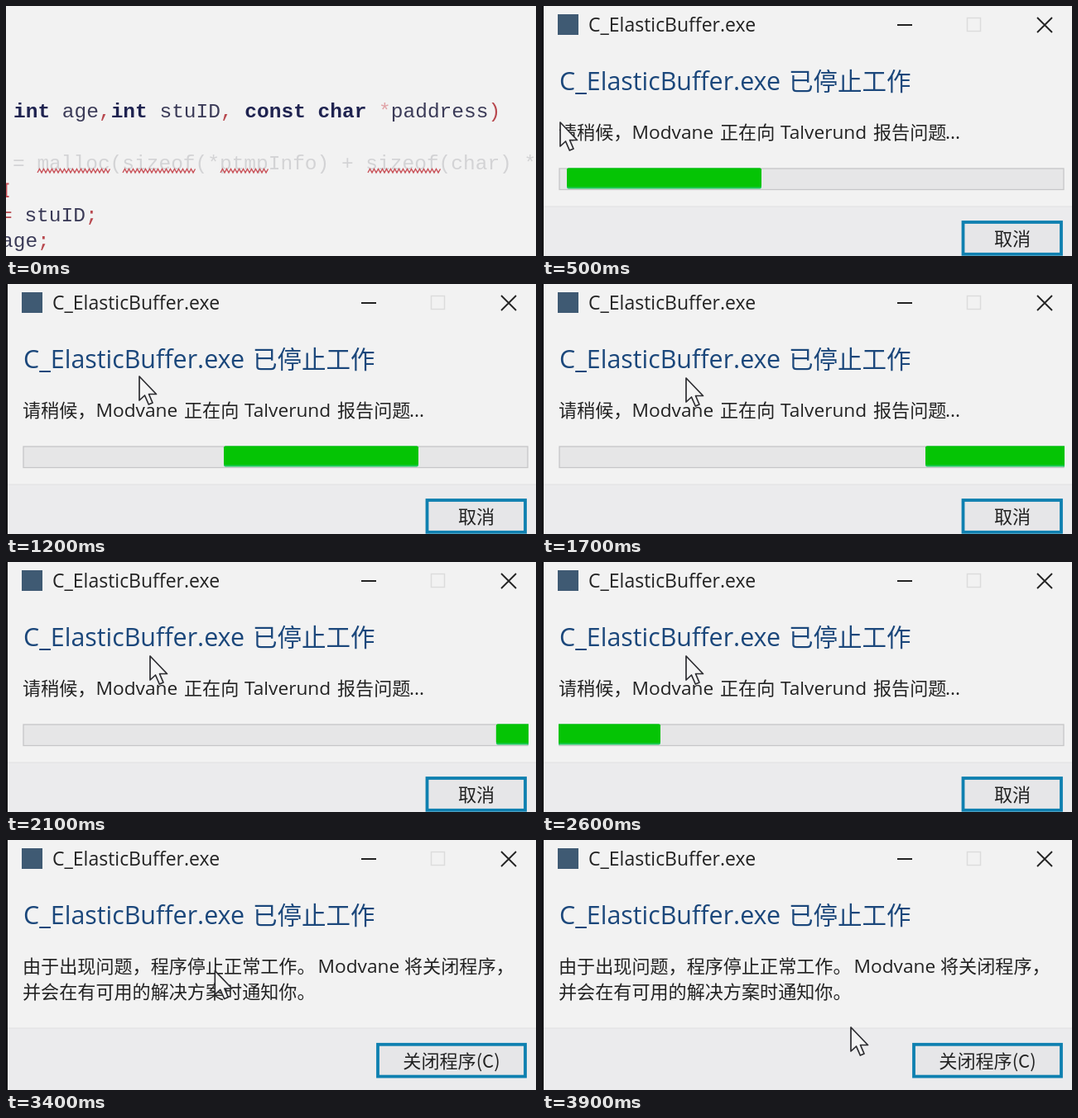
These frames come from a looping animation (640 px wide and 303 px high, 4 s). An HTML page:

```html
<!DOCTYPE html>
<html lang="zh-CN">
<head>
<meta charset="utf-8">
<style>
  html, body { margin: 0; width: 100%; height: 100%; overflow: hidden; background: #f2f2f2; }
  svg { display: block; width: 100vw; height: 100vh; }
  text { white-space: pre; }
  .code { font: 24.5px "Liberation Mono", monospace; fill: #3b3b58; }
  .key { font-weight: bold; fill: #1f2350; }
  .red { fill: #b8484e; }
  .pale { fill: #e0a2a6; }
  .faint { fill: #d3d3d5; }
  .ui { font: 22.7px "Open Sans", "Noto Sans CJK SC", "Noto Sans CJK", sans-serif; fill: #222; }
  .cjk { font-family: "Noto Sans CJK SC", "Noto Sans CJK", sans-serif; font-size: 22.1px; }
  .title { font-size: 23px; }
  .head { font-size: 30.4px; fill: #1b477b; }
  .head.cjk { font-size: 29.5px; }
</style>
</head>
<body>
<svg viewBox="0 0 640 303" preserveAspectRatio="none">
  <defs>
    <clipPath id="track"><rect x="20" y="196" width="611" height="27"/></clipPath>
  </defs>
  <rect width="640" height="303" fill="#f2f2f2"/>

  <g id="editor" class="code">
    <text x="9" y="135"><tspan class="key">int</tspan> age<tspan class="red">,</tspan><tspan class="key">int</tspan> stuID<tspan class="red">,</tspan> <tspan class="key">const</tspan> <tspan class="key">char</tspan> <tspan class="pale">*</tspan>paddress<tspan class="red">)</tspan></text>
    <text x="8" y="198" class="faint">= malloc(sizeof(*ptmpInfo) + sizeof(char) *</text>
    <path id="waves" fill="none" stroke="#c9535a" stroke-width="1.4"/>
    <path d="M-2 215.5H3.5M-2 231H3.5M0.5 215V231" fill="none" stroke="#c8525a" stroke-width="1.8"/>
    <text x="-7" y="261"><tspan class="red">=</tspan> stuID<tspan class="red">;</tspan></text>
    <text x="-6" y="292">age<tspan class="red">;</tspan></text>
  </g>

  <g id="dialog" class="ui">
    <rect id="footer" width="640" height="80" fill="#ebebed"/>
    <path id="rule" d="M0 0H640" stroke="#dfdfe1"/>
    <rect width="2" height="303" fill="#151518"/>
    <rect x="19" y="10" width="25" height="25" fill="#3f5a73"/>
    <text x="56" y="31" class="title">C_ElasticBuffer.exe</text>
    <path d="M429 23H447" stroke="#222" stroke-width="2"/>
    <rect x="513.5" y="14.5" width="16" height="16" fill="none" stroke="#dcdcdc" stroke-width="1.5"/>
    <path d="M598 14L616 32M616 14L598 32" stroke="#222" stroke-width="1.8"/>
    <text x="21" y="102" class="head">C_ElasticBuffer.exe</text>
    <text x="298" y="102" class="head cjk">已停止工作</text>

    <g id="reporting">
      <text x="20" y="161" class="cjk">请稍候，</text>
      <text x="108.5" y="161">Modvane</text>
      <text x="215" y="161" class="cjk">正在向</text>
      <text x="288" y="161">Talverund</text>
      <text x="400" y="161" class="cjk">报告问题</text>
      <text x="487" y="161">...</text>
      <rect x="21" y="197" width="609" height="25.5" fill="#e6e6e7" stroke="#c6c6c8" stroke-width="1.3"/>
      <g id="bar" clip-path="url(#track)">
        <g id="fill">
          <rect y="196.5" width="235" height="25" rx="2" fill="#1fc95a"/>
          <rect y="196.5" width="235" height="23" rx="2" fill="#05c405"/>
        </g>
      </g>
    </g>

    <g id="stopped">
      <text x="20" y="161" class="cjk">由于出现问题，程序停止正常工作。</text>
      <text x="376.5" y="161">Modvane</text>
      <text x="481" y="161" class="cjk">将关闭程序，</text>
      <text x="20" y="192" class="cjk">并会在有可用的解决方案时通知你。</text>
    </g>

    <rect id="button" fill="#e6e6e8" stroke="#0f80b0" stroke-width="3.8"/>
    <text id="label" text-anchor="middle" class="cjk"></text>
    <path id="pointer" d="M0 0V29L6.5 23L11.3 34L16 32L11.5 21.5H20.5Z" fill="#f4f4f4" stroke="#2c2c30" stroke-width="1.7" stroke-linejoin="round"/>
  </g>
</svg>
<script>
const LOOP = 4000, STEP = 100, OPEN = 200, STOP = 2900;
const $ = id => document.getElementById(id);
const show = (id, on) => $(id).setAttribute('display', on ? 'inline' : 'none');
const set = (id, attrs) => {
  for (const k in attrs) $(id).setAttribute(k, attrs[k]);
};
const smooth = u => u * u * (3 - 2 * u);
const linear = u => u;

// Each key is [time, ...values]; values hold beyond the ends.
function sample(keys, t, ease) {
  if (t <= keys[0][0]) return keys[0].slice(1);
  for (let i = 1; i < keys.length; i++) {
    const a = keys[i - 1], b = keys[i];
    if (t <= b[0]) {
      const u = ease((t - a[0]) / (b[0] - a[0]));
      return a.slice(1).map((v, j) => v + (b[j + 1] - v) * u);
    }
  }
  return keys[keys.length - 1].slice(1);
}

const barKeys = [[200, -37], [300, -3], [500, 30], [1200, 263], [1700, 463], [2600, 753], [2900, 853]];
const pointerKeys = [[500, 22, 141], [1200, 161, 112], [1700, 174, 114], [3100, 174, 114], [3800, 373, 227]];
const TRAVEL = 845;

function wave(from, to) {
  let d = `M${from} 202`;
  for (let x = from + 2.5, up = true; x <= to; x += 2.5, up = !up) d += `L${x} ${up ? 197.5 : 202}`;
  return d;
}
set('waves', { d: [[38, 126], [141, 229], [259, 318], [437, 525]].map(w => wave(...w)).join('') });

function draw(time) {
  let t = Math.floor(time % LOOP / STEP) * STEP;
  if (t === 400) t = 300; // the bar rests here for one step
  const open = t >= OPEN, stopped = t >= STOP;
  show('editor', !open);
  show('dialog', open);
  if (!open) return;

  show('reporting', !stopped);
  show('stopped', stopped);
  const edge = stopped ? 228 : 243;
  set('footer', { y: edge });
  set('rule', { transform: `translate(0 ${edge})` });
  set('button', stopped
    ? { x: 449, y: 247.8, width: 178, height: 38.8 }
    : { x: 508.5, y: 262, width: 118.5, height: 38.8 });
  set('label', stopped ? { x: 538, y: 275.5 } : { x: 568, y: 290 });
  $('label').textContent = stopped ? '关闭程序(C)' : '取消';

  const [x] = sample(barKeys, t, linear);
  set('fill', { transform: `translate(${x > 631 ? x - TRAVEL : x} 0)` });
  const [px, py] = sample(pointerKeys, t, smooth);
  set('pointer', { transform: `translate(${px} ${py})` });
}

let start;
function tick(now) {
  if (start === undefined) start = now;
  draw(now - start);
  requestAnimationFrame(tick);
}
draw(0);
requestAnimationFrame(tick);
</script>
</body>
</html>
```
